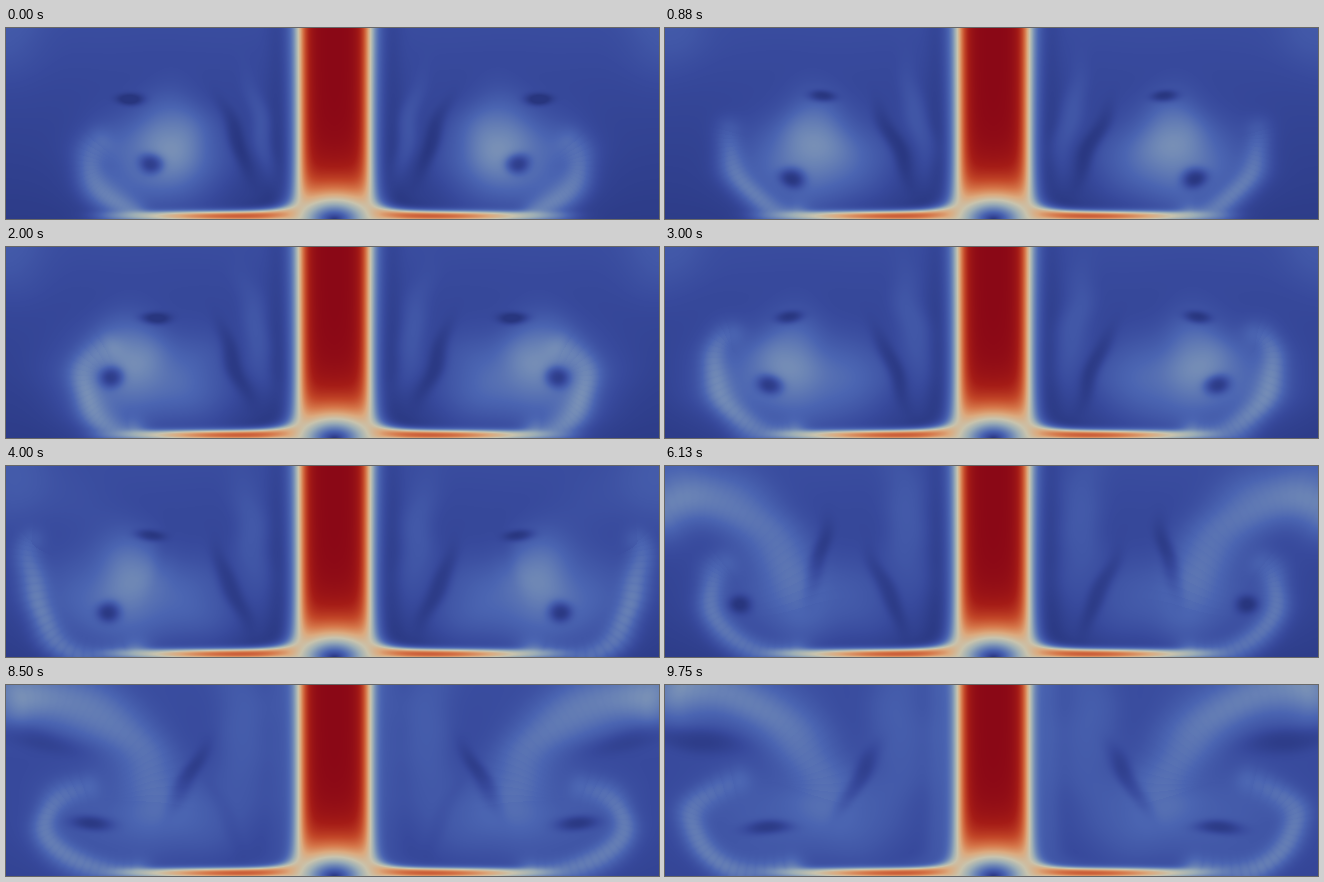
A matplotlib script for the animation above (9870 ms loop, 653 by 191 pixels).

```python
import numpy as np
import matplotlib.pyplot as plt
from matplotlib.animation import FuncAnimation
from matplotlib.colors import LinearSegmentedColormap

W, H, AXIS = 653, 191, 328
LOOP, FRAMES = 9870, 79
STEP = LOOP / FRAMES

SPEED_MAP = LinearSegmentedColormap.from_list("speed", [
    "#27347c", "#384a9d", "#4b65b2", "#6f88b6", "#9badb6", "#c9c4ae",
    "#dcaa7e", "#d6784b", "#c24628", "#a51c17", "#8a0816"], N=512)

# Left half of the flow; the right half is its mirror image.
Y, X = np.mgrid[0:H, 0:AXIS + 1].astype(float)
R = AXIS - X
UP = H - Y

# Paths of the vortex core and of the outer edge of the wall jet's curl.
SECONDS = [0, .88, 2, 4, 6.13, 7.25, 9.75]
CORE_X = [142, 127, 104, 104, 77, 77, 100]
CORE_Y = [134, 148, 131, 144, 138, 132, 143]
EDGE_X = [82, 68, 74, 24, 44, 52, 26]
EDGE_Y = [150, 138, 136, 110, 132, 138, 132]
HOOK = [12, -6, 26, 4, 14, 34, 48]

# The arch that the old vortex leaves behind, and its later drift.
ARCH = np.array([(0, 46), (62, 36), (112, 80), (138, 145)], float)
DRIFT = np.array([(20, -44), (24, -18), (28, -20), (14, -32)], float)


def ease(t, start, end):
    k = np.clip((t - start) / (end - start), 0, 1)
    return k * k * (3 - 2 * k)


def mix(a, b, k):
    return a + (b - a) * k


def blob(x, y, cx, cy, rx, ry, deg, strength):
    c, s = np.cos(np.radians(deg)), np.sin(np.radians(deg))
    dx, dy = x - cx, y - cy
    q = ((dx * c + dy * s) / rx) ** 2 + ((dy * c - dx * s) / ry) ** 2
    return strength * np.exp(-q ** 1.25)


def cubic_weights(n):
    """Weights of a cubic passing through four evenly spaced knots."""
    t, knots = np.linspace(0, 1, n), np.arange(4) / 3
    return np.stack([
        np.prod([(t - b) / (a - b) for b in knots if b != a], axis=0)
        for a in knots], axis=1)


WEIGHTS = cubic_weights(26)


def stroke(x, y, points, width, strength):
    path = WEIGHTS @ np.asarray(points, float)
    near = np.full(x.shape, 1e9)
    along = np.zeros(x.shape)
    for i, (px, py) in enumerate(path):
        dist = (x - px) ** 2 + (y - py) ** 2
        closer = dist < near
        near[closer] = dist[closer]
        along[closer] = i / (len(path) - 1)
    fade = 1 - .6 * along ** 3
    return strength * fade * np.exp(-near / width ** 2)


def jet():
    """Cover and speed of the falling jet and the layer along the wall."""
    side = (R - 35 - 12 * np.exp(-UP / 22)) / 5
    wall = (183.5 - 3 * np.exp((40 - R) / 25) - Y) / 1.5
    k = 2.5
    edge = -k * np.log(np.exp(-side / k) + np.exp(-wall / k))
    lift_off = 1 / (1 + np.exp((R - 238) / 9))
    cover = lift_off / (1 + np.exp(edge))
    stagnation = np.tanh(np.hypot(R / 1.7, UP) / 36)
    decay = np.exp(-(R / 215) ** 3)
    drag = 1 - .35 * np.exp(-UP / 2) * ease(R, 25, 60)
    rim = np.exp(-((edge - 4.5) / 2.5) ** 2 - (R / 75) ** 4)
    return cover, stagnation * decay * drag, rim


COVER, JET_SPEED, RIM = jet()


def surroundings(t, x, y):
    """Slow air beside the jet, t in seconds."""
    age = t / (LOOP / 1000)
    spread = ease(t, 0, 4)
    old = ease(t, 3.2, 6.4)
    young = 1 - old
    late = ease(t, 6, 9.75)
    core_x, core_y, edge_x, edge_y, hook = (
        np.interp(t, SECONDS, track)
        for track in (CORE_X, CORE_Y, EDGE_X, EDGE_Y, HOOK))

    air = .11 - .07 * (y / H) * (1 - .6 * late) - RIM * mix(.05, -.07, late)
    air = air + blob(x, y, 0, 0, 40, 45, 0, .05)

    # vortex bubble and its head
    air += blob(x, y, mix(140, 112, spread), 136, mix(60, 86, spread), 50,
                5 * spread, mix(.17, .08, old))
    air += blob(x, y, core_x + 22, 102, 32, 40, 0, .10 * young)
    air += blob(x, y, 198, 130, 38, 46, -10, .06)

    # curl of the wall jet and the arch above it
    curl = [(128, 188), (edge_x + 25, 175), (edge_x, edge_y),
            (edge_x + hook, edge_y - 36)]
    air += stroke(x, y, curl, 14, .17)
    air += stroke(x, y, ARCH + late * DRIFT, 30, .17 * old)

    # light column beside the jet
    air += blob(x, y, mix(256, 234, age), mix(105, 45, age),
                mix(10, 30, age), mix(52, 85, age), mix(-14, -3, age), .07)

    # dark cores and streaks
    air += blob(x, y, core_x, core_y, mix(12, 24, late), mix(10, 7, late),
                0, mix(-.21, -.13, old))
    eddy_x = 142 + 20 * np.sin(2 * np.pi * t / 3.5 - .9)
    air += blob(x, y, eddy_x, 69, 14, 6, 0, -.14 * young)
    air += blob(x, y, mix(230, 216, age), mix(112, 130, age), 9, 38, -22,
                -.08 * (1 - late))
    air += blob(x, y, mix(153, 192, late), 94, 9, 36, mix(10, 32, late),
                -.09 * old)
    air += blob(x, y, 30, 54, 48, 12, 10, -.07 * late)
    return np.clip(air, .01, .46)


def flow(ms):
    phase = 2 * np.pi * ms / 2500
    x = X + 2.2 * np.sin(Y / 17 + X / 41 - phase) + np.sin(Y / 8 + phase)
    y = Y + 2.0 * np.sin(X / 19 - Y / 37 + phase)
    air = surroundings(ms / 1000, x, y)
    half = COVER * JET_SPEED + (1 - COVER) * air
    return np.hstack([half, half[:, -2::-1]])[:, :W]


fig = plt.figure(figsize=(W / 100, H / 100), dpi=100)
ax = fig.add_axes([0, 0, 1, 1])
ax.axis("off")
image = ax.imshow(flow(0), cmap=SPEED_MAP, vmin=0, vmax=1,
                  aspect="auto", interpolation="nearest")


def draw(frame):
    image.set_data(flow(frame * STEP))
    return [image]


anim = FuncAnimation(fig, draw, frames=FRAMES, interval=STEP,
                     repeat=True, repeat_delay=0, blit=False)
plt.show()
```
